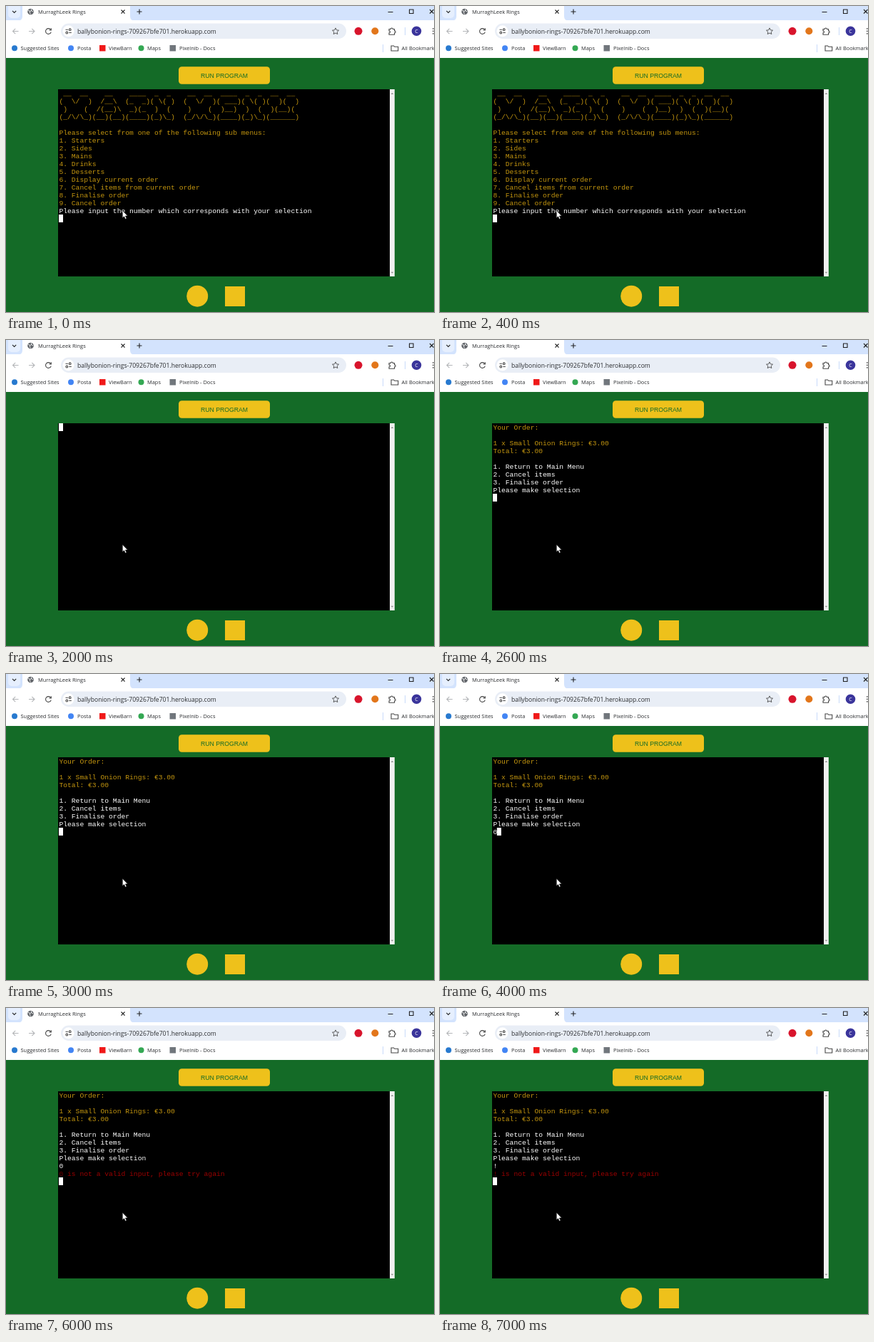
Animation, 600 px wide and 430 px high, one loop 8000 ms. Source, as an HTML page:

```html
<!DOCTYPE html>
<html lang="en">
<head>
<meta charset="utf-8">
<title>MurraghLeek Rings</title>
<style>
  html, body { margin: 0; width: 600px; height: 430px; overflow: hidden; background: #146b27; }
  svg { position: absolute; left: 0; top: 0; }
  .ui { font: 7.45px "Open Sans", "Noto Sans", sans-serif; fill: #2b2d30; }
  .url { font-size: 8.58px; }
  .line { fill: none; stroke: #474747; stroke-width: 1.1; }
  .dark { stroke: #222; }
  .pale { stroke: #b4b6b9; }
  .btn { font: 8.67px "Liberation Sans", Arial, sans-serif; fill: #146b27; }

  .term { position: absolute; left: 73px; top: 117px; width: 465px; height: 263px; background: #000; overflow: hidden; }
  pre { position: absolute; left: 1.4px; top: 1px; margin: 0; color: #fff;
        font: 9.68px/11px "Liberation Mono", "Courier New", monospace; }
  .gold { color: #c4960f; }
  .bad { color: #9c0000; }
  .bad b { color: #6e0000; font-weight: normal; }
  .r9 { top: 100px; }
  .r10 { top: 111px; }
  .caret { position: absolute; left: .5px; top: 0; width: 6px; height: 10.500px; background: #fff; }

  .menu, .order, .zero, .zeroErr, .bang, .bangErr, .caret { animation: 8s step-end infinite; }
  .menu { animation-name: menu; }
  .order { animation-name: order; }
  .zero { animation-name: zero; }
  .zeroErr { animation-name: zeroErr; }
  .bang { animation-name: bang; }
  .bangErr { animation-name: bangErr; }
  .caret { animation-name: caret; }
  @keyframes menu { 0% { opacity: 1 } 17.5%, 100% { opacity: 0 } }
  @keyframes order { 0% { opacity: 0 } 32.5%, 100% { opacity: 1 } }
  @keyframes zero { 0% { opacity: 0 } 46.25% { opacity: 1 } 85%, 100% { opacity: 0 } }
  @keyframes zeroErr { 0% { opacity: 0 } 57.5% { opacity: 1 } 85%, 100% { opacity: 0 } }
  @keyframes bang { 0% { opacity: 0 } 85%, 100% { opacity: 1 } }
  @keyframes bangErr { 0% { opacity: 0 } 87.5%, 100% { opacity: 1 } }
  @keyframes caret {
    0% { transform: translate(0, 176px) }
    17.5% { transform: translate(0, 0) }
    32.5% { transform: translate(0, 99px) }
    46.25% { transform: translate(5.8px, 99px) }
    57.5% { transform: translate(0, 121px) }
    85% { transform: translate(5.8px, 99px) }
    87.5%, 100% { transform: translate(0, 121px) }
  }
</style>
</head>
<body>
<svg width="600" height="430" viewBox="0 0 600 430">
  <!-- tab strip -->
  <rect width="600" height="30" fill="#d3e3fd"/>
  <rect x="3" y="-4" width="17" height="21" rx="5" fill="#e6effe"/>
  <path class="line dark" d="M9 6.800l2.600 2.600 2.600-2.600"/>
  <path d="M17 20.500q6 0 6-6V-6H174V14.500q0 6 6 6z" fill="#fff"/>
  <circle cx="34.500" cy="8" r="4.300" fill="#5f6368"/>
  <path d="M31.200 6.500l3 1-1 2 1.500 2M36 4.300l-1 2 2.800 1.500" fill="none" stroke="#fff"/>
  <text class="ui" x="45" y="10.800">MurraghLeek Rings</text>
  <path class="line dark" d="M161.500 5.500l5 5m0-5l-5 5M183.500 8h7M187 4.500v7"/>
  <path class="line dark" d="M535.500 8.500h7M565.500 5h5.500v5.500h-5.500zM594 5l5.500 5.500m0-5.500l-5.500 5.500"/>

  <!-- toolbar -->
  <rect y="20" width="600" height="53" fill="#fff"/>
  <path class="line pale" d="M17.500 35.500h-8m3.700-3.700l-3.700 3.700 3.700 3.700M32 35.500h8m-3.700-3.700l3.700 3.700-3.700 3.700"/>
  <path class="line" d="M62.700 33.300a3.900 3.900 0 1 0 .5 3.300M63.300 31.200v2.800h-2.800"/>
  <rect x="77" y="24.500" width="400" height="21.500" rx="10.750" fill="#e9eef6"/>
  <circle cx="87.500" cy="35.300" r="8" fill="#fff"/>
  <g class="line">
    <path d="M83.500 33.300h3.500M88.300 37.500h3.500"/>
    <circle cx="89.700" cy="33.300" r="1.400"/>
    <circle cx="85.300" cy="37.500" r="1.400"/>
    <path d="M462 30.900l1.350 2.900 3.150.4-2.300 2.200.6 3.100-2.800-1.500-2.800 1.500.6-3.100-2.300-2.200 3.150-.4z" stroke-width=".9"/>
  </g>
  <text class="ui url" x="100" y="38.500">ballybonion-rings-709267bfe701.herokuapp.com</text>
  <circle cx="494" cy="35.300" r="5.500" fill="#d8142c"/>
  <circle cx="517.300" cy="35.300" r="5" fill="#e2761b"/>
  <path class="line" d="M537 32.500h2.300a1.500 1.500 0 0 1 3 0h2.300v2.400a1.500 1.500 0 0 1 0 3v2.300h-7.600v-2.300a1.500 1.500 0 0 0 0-3z"/>
  <path d="M559.500 30v11M528.500 54v11" stroke="#c9dbfa"/>
  <circle cx="575.500" cy="35.300" r="6.800" fill="#3a349b"/>
  <text class="ui" x="575.500" y="37.900" text-anchor="middle" style="fill:#fff;font-size:7px">C</text>
  <g fill="#474747">
    <circle cx="598.800" cy="31.800" r=".9"/><circle cx="598.800" cy="35.300" r=".9"/><circle cx="598.800" cy="38.800" r=".9"/>
  </g>

  <!-- bookmarks -->
  <circle cx="12" cy="59.300" r="4" fill="#2779cf"/>
  <circle cx="91" cy="59.300" r="4" fill="#4285f4"/>
  <rect x="131" y="55" width="8.500" height="8.500" fill="#f01818"/>
  <circle cx="189.500" cy="59.300" r="4" fill="#34a853"/>
  <rect x="229.500" y="55" width="8.500" height="8.500" fill="#70767c"/>
  <g class="ui">
    <text x="20.500" y="62">Suggested Sites</text>
    <text x="100" y="62">Posta</text>
    <text x="144" y="62">ViewBarn</text>
    <text x="198" y="62">Maps</text>
    <text x="243" y="62">Pixelnib - Docs</text>
    <text x="554.500" y="62">All Bookmarks</text>
  </g>
  <path class="line" d="M540 56h3.500l1.200 1.300h5v5.700H540z"/>

  <!-- page -->
  <rect y="73" width="600" height="357" fill="#146b27"/>
  <rect x="242" y="85.300" width="128" height="24.500" rx="4.500" fill="#eec11b"/>
  <text class="btn" x="273" y="100.500">RUN PROGRAM</text>
  <rect x="538" y="117" width="6.800" height="263" fill="#f0f0f0"/>
  <path d="M539.600 124l1.800-2 1.800 2zM539.600 373.800l1.800 2 1.800-2z" fill="#8a8a8a"/>
  <circle cx="268.200" cy="407.700" r="15" fill="#eec11b"/>
  <rect x="307" y="394" width="28" height="28" fill="#eec11b"/>
</svg>

<div class="term">
<pre class="menu gold"> __  __    __    ____  _  _    __  __  ____  _  _  __  __ 
(  \/  )  /__\  (_  _)( \( )  (  \/  )( ___)( \( )(  )(  )
 )    (  /(__)\  _)(_  )  (    )    (  )__)  )  (  )(__)( 
(_/\/\_)(__)(__)(____)(_)\_)  (_/\/\_)(____)(_)\_)(______)

Please select from one of the following sub menus:
1. Starters
2. Sides
3. Mains
4. Drinks
5. Desserts
6. Display current order
7. Cancel items from current order
8. Finalise order
9. Cancel order
<span style="color:#fff">Please input the number which corresponds with your selection</span></pre>
<pre class="order"><span class="gold">Your Order:

1 x Small Onion Rings: €3.00
Total: €3.00</span>

1. Return to Main Menu
2. Cancel items
3. Finalise order
Please make selection</pre>
<pre class="zero r9">0</pre>
<pre class="zeroErr r10 bad"><b>0</b> is not a valid input, please try again</pre>
<pre class="bang r9">!</pre>
<pre class="bangErr r10 bad"><b>!</b> is not a valid input, please try again</pre>
<div class="caret"></div>
</div>

<svg width="600" height="430" viewBox="0 0 600 430">
  <path d="M163.300 287.500v10.300l2.300-2.100 1.700 3.700 1.700-.8-1.700-3.600h3.200z" fill="#fff" stroke="#000" stroke-width=".5"/>
</svg>
</body>
</html>
```
